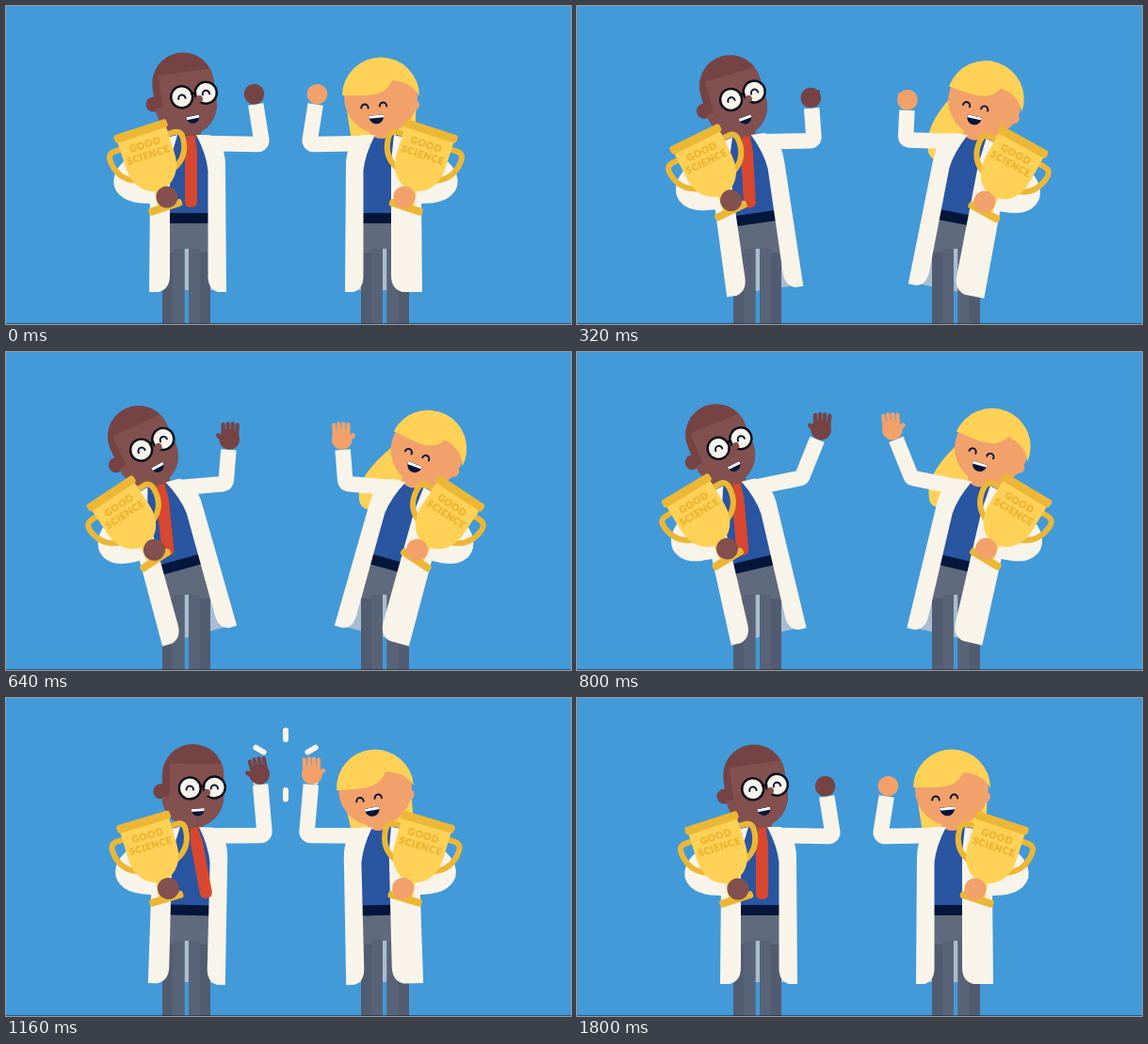
Write an HTML page with a canvas that moves like this. It is 600 px wide and 338 px high and loops after 1.84 s.

```html
<!DOCTYPE html>
<html lang="en">
<head>
<meta charset="utf-8">
<title>Good science</title>
<style>
html, body { margin: 0; width: 100%; height: 100%; overflow: hidden; background: #429ad9; }
canvas { display: block; width: 600px; height: 338px; }
</style>
</head>
<body>
<canvas id="stage"></canvas>
<script>
const LOOP = 1840, STEP = 40, CLAP = 1040;
const C = {
  bg: '#429ad9', coat: '#f8f4e9', lining: '#a9bdd2', shirt: '#2955a1', navy: '#04163a',
  pants: '#5f6a7d', leg: '#596377', legDark: '#525c70', tie: '#d8472f',
  gold: '#ffd257', goldDark: '#ecb735', hair: '#764344', skin: '#82504f', blond: '#ffd257',
  peach: '#f2a16a', frame: '#0b0f1c', white: '#ffffff'
};
// lead: ms ahead in the wind-up; nodBack, nodOn: head turn leaning away and at the clap.
const man = { lead: 0, nodBack: -1, nodOn: 7, wristTurn: -14, panel: 174, face: C.skin, fist: C.hair, flip: 1, head: manHead };
const woman = { lead: 60, nodBack: -11, nodOn: 3, wristTurn: -2, panel: 185, face: C.peach, fist: C.peach, flip: -1, head: womanHead };

const canvas = document.getElementById('stage');
const ctx = canvas.getContext('2d');
const ratio = window.devicePixelRatio || 1;
canvas.width = 600 * ratio;
canvas.height = 338 * ratio;

const rad = d => d * Math.PI / 180;
function ease(t, from, to) {
  const u = Math.min(1, Math.max(0, (t - from) / (to - from)));
  return u * u * (3 - 2 * u);
}

// Four overlapping actions drive every joint.
function pose(p, t) {
  const wind = ease(t, 60 - p.lead, 560 - p.lead) - ease(t, 720, CLAP);
  const swing = ease(t, 560, 860) - ease(t, CLAP, 1200);
  const shock = ease(t, 900, 1060) - ease(t, 1120, 1460);
  const open = ease(t, 280, 460) - ease(t, 1300, 1800);
  return {
    wind, open,
    lean: -15.5 * wind + 1.5 * shock,
    nod: p.nodBack * wind + p.nodOn * shock,
    tie: -6 * wind - 11 * shock,
    upper: 1 - 4 * wind - 10 * swing,
    upperLen: 59 - 8 * wind,
    fore: -9 + 9 * wind + 26 * swing,
    foreLen: 54 - 18 * wind + 10 * open + 7 * swing,
    handTurn: p.wristTurn * (1 - wind) + 6 * swing
  };
}

function fill(d, color) {
  ctx.fillStyle = color;
  ctx.fill(new Path2D(d));
}
function stroke(d, color, width, cap = 'round') {
  ctx.strokeStyle = color;
  ctx.lineWidth = width;
  ctx.lineCap = cap;
  ctx.lineJoin = 'round';
  ctx.stroke(new Path2D(d));
}
function dot(x, y, r, color) {
  ctx.fillStyle = color;
  ctx.beginPath();
  ctx.arc(x, y, r, 0, 7);
  ctx.fill();
}
function bar(x, y, w, h, r, color) {
  ctx.fillStyle = color;
  ctx.beginPath();
  ctx.roundRect(x, y, w, h, r);
  ctx.fill();
}
function at(x, y, turn, draw) {
  ctx.save();
  ctx.translate(x, y);
  ctx.rotate(rad(turn));
  draw();
  ctx.restore();
}
function turned(x, y, angle) {
  const a = rad(angle);
  return [x * Math.cos(a) - y * Math.sin(a), x * Math.sin(a) + y * Math.cos(a)];
}

// The torso turns about the hip, which slides a little with it.
function torsoPoint(lean, x, y) {
  const [dx, dy] = turned(x - 195, y - 228, lean);
  return [195 + lean / 2 + dx, 228 + dy];
}
function inTorso(lean, draw) {
  at(195 + lean / 2, 228, lean, () => {
    ctx.translate(-195, -228);
    draw();
  });
}

function smile(x, y, w, h, turn) {
  at(x, y, turn, () => {
    const mouth = `M${-w} 0H${w}C${w} ${h * 1.25} ${-w} ${h * 1.25} ${-w} 0Z`;
    fill(mouth, C.navy);
    ctx.clip(new Path2D(mouth));
    bar(-w, 0, 2 * w, 3, 0, C.white);
  });
}
const eye = (x, y) => stroke(`M${x - 3.7} ${y + 1.6}A3.7 4 0 0 1 ${x + 3.7} ${y + 1.6}`, C.navy, 2);

function manHead() {
  ctx.translate(199.5, 94.5);
  ctx.rotate(rad(-8));
  dot(-44, 4, 8, C.hair);
  ctx.save();
  ctx.beginPath();
  ctx.roundRect(-42.5, -46.5, 65.5, 88.5, 32.7);
  ctx.fillStyle = C.hair;
  ctx.fill();
  ctx.clip();
  fill('M-34.5 -25.5H30V50H-45V9H-34.5Z', C.skin);
  ctx.restore();
  for (const side of [-1, 1]) {
    dot(side * 13, -side * 0.5, 11.5, C.coat);
    ctx.strokeStyle = C.frame;
    ctx.lineWidth = 2.4;
    ctx.stroke();
    eye(side * 13, -side * 0.5);
  }
  stroke('M-2 -1Q0 -3 2 -1', C.frame, 2.4);
  dot(5, 5, 3.8, C.skin);
  smile(-4.5, 22, 7, 8.5, -4);
}

function womanHead() {
  ctx.translate(196, 96);
  dot(-35, 9, 6, C.peach);
  dot(0, 1, 39, C.peach);
  fill('M41 -1A41 41 0 0 0 -41 0C-36 -10 -26 -16 -12 -17C-7 -4 5 -1 20 -1Z', C.blond);
  eye(17, 11);
  eye(-2.5, 9);
  smile(5, 20, 8, 10, 6);
}

function longHair(s) {
  const [x, y] = torsoPoint(s.lean, 196, 96);
  const [dx] = turned(0, -39, s.nod);
  const headX = x + dx, tipX = 226 - 8 * s.wind, tipY = 148 + 13 * s.wind;
  fill(`M${headX + 38} ${y}Q${tipX + 5} ${tipY - 28} ${tipX + 1} ${tipY - 5}Q${tipX} ${tipY + 7} ${tipX - 12} ${tipY + 6}L${tipX - 66} ${tipY}L${headX - 38} ${y}Z`, C.blond);
}

function hand(x, y, turn, open, color) {
  at(x, y, turn, () => {
    dot(0, 0, 10.8, color);
    if (open < 0.02) return;
    for (let i = 0; i < 4; i++) {
      const fx = -6.6 + i * 4.8, tip = 17 - Math.abs(i - 1.5);
      stroke(`M${fx} -4L${fx * 1.05} ${-4 - (tip - 4) * open}`, color, 4.3);
    }
    stroke(`M-5 2L${-5 - 7 * open} ${2 - 6 * open}`, color, 4.8);
  });
}

function raisedArm(p, s) {
  const [sx, sy] = torsoPoint(s.lean, 213, 146);
  const [ux, uy] = turned(s.upperLen, 0, s.upper);
  const [wx, wy] = turned(0, 11 - s.foreLen, s.fore);
  const [hx, hy] = turned(0, -s.foreLen, s.fore);
  const ex = sx + ux, ey = sy + uy;
  ctx.beginPath();
  ctx.moveTo(sx, sy);
  ctx.arcTo(ex, ey, ex + wx, ey + wy, 4);
  ctx.lineTo(ex + wx, ey + wy);
  ctx.strokeStyle = C.coat;
  ctx.lineWidth = 16.5;
  ctx.lineCap = 'butt';
  ctx.lineJoin = 'round';
  ctx.stroke();
  hand(ex + hx, ey + hy, s.handTurn, s.open, p.fist);
}

function trophy(flip) {
  for (const side of [-1, 1]) {
    ctx.save();
    ctx.scale(side, 1);
    stroke('M24 12H33Q41 12 40.5 21Q39 42 20 49', C.goldDark, 6);
    ctx.restore();
  }
  fill('M-5 60H5L8 84H-8Z', C.gold);
  fill('M-27 2H27V32C27 54 14 66 0 66S-27 54 -27 32Z', C.gold);
  bar(-29.5, -4.5, 59, 9, 3, C.goldDark);
  bar(-18.5, 81, 37, 8, 3, C.goldDark);
  ctx.save();
  ctx.scale(flip, 1);
  ctx.fillStyle = ctx.strokeStyle = C.goldDark;
  ctx.lineWidth = 0.5;
  ctx.textAlign = 'center';
  ctx.textBaseline = 'middle';
  ctx.font = '900 10.3px Lato, "Open Sans", sans-serif';
  ctx.letterSpacing = '0.7px';
  ['GOOD', 'SCIENCE'].forEach((word, i) => {
    ctx.fillText(word, 0, 15.5 + i * 11.5);
    ctx.strokeText(word, 0, 15.5 + i * 11.5);
  });
  ctx.restore();
}

function legs(lean) {
  const [lx, ly] = torsoPoint(lean, 173, 228), [rx, ry] = torsoPoint(lean, 215, 228);
  fill(`M${lx} ${ly}L${rx} ${ry}L217 262V338H194V258H189.5V338H166V262Z`, C.pants);
  bar(166, 262, 11.5, 76, 0, C.legDark);
  bar(177.5, 258, 12, 80, 0, C.leg);
  bar(194, 258, 11.5, 80, 0, C.leg);
  bar(205.5, 262, 11.5, 76, 0, C.legDark);
}

function person(p, t) {
  const s = pose(p, t);
  ctx.save();
  if (p === woman) {
    ctx.translate(594, 0);
    ctx.scale(-1, 1);
    longHair(s);
  }
  inTorso(s.lean, () => fill('M172 215H226L229 302H160Z', C.lining));
  legs(s.lean);
  inTorso(s.lean, () => {
    fill('M172 137H206L217 160V222H172Z', C.shirt);
    bar(172, 220, 44, 11, 0, C.navy);
    fill('M184 120H207V136Q196 146 184 136Z', p.face);
    const x = p.panel;
    fill(`M182 137L162 142L153 200L152 304H${x - 12}Q${x} 301 ${x} 286V165Z`, C.coat);
    fill('M202 137H216Q233 144 233 170L234 304H225Q214.5 301 214.5 287V175Q213 158 202 137Z', C.coat);
    if (p === man) {
      at(196.5, 138, s.tie - s.lean, () => fill('M-4 0H4L6.5 16V70Q6.5 76 0 76T-6.5 70V16Z', C.tie));
    }
  });
  raisedArm(p, s);
  inTorso(s.lean, () => {
    at(196, 135, s.nod, () => {
      ctx.translate(-196, -135);
      p.head();
    });
    stroke('M155 162C123 172 115 195 143 198L162 199', C.coat, 23, 'butt');
    at(143, 133, -18, () => trophy(p.flip));
    dot(171, 203, 11.5, p.face);
  });
  ctx.restore();
}

function burst(t) {
  const u = (t - CLAP) / 520;
  if (u < 0 || u >= 1) return;
  const inner = 37 * (1 - (1 - u) ** 4);
  const len = Math.max(2.5, 39.5 * ease(t, CLAP - 40, CLAP + 90) - inner);
  for (let i = 0; i < 6; i++) {
    at(297, 71, 30 + i * 60, () => bar(inner, -3, len, 6, Math.min(3, len / 2), C.coat));
  }
}

function draw(now) {
  const t = Math.floor(now % LOOP / STEP) * STEP;
  ctx.setTransform(ratio, 0, 0, ratio, 0, 0);
  bar(0, 0, 600, 338, 0, C.bg);
  burst(t);
  person(man, t);
  person(woman, t);
  bar(0, 337, 600, 1, 0, 'rgba(20,45,70,0.6)');
}

const start = performance.now();
function frame() {
  draw(performance.now() - start);
  requestAnimationFrame(frame);
}
frame();
</script>
</body>
</html>
```
